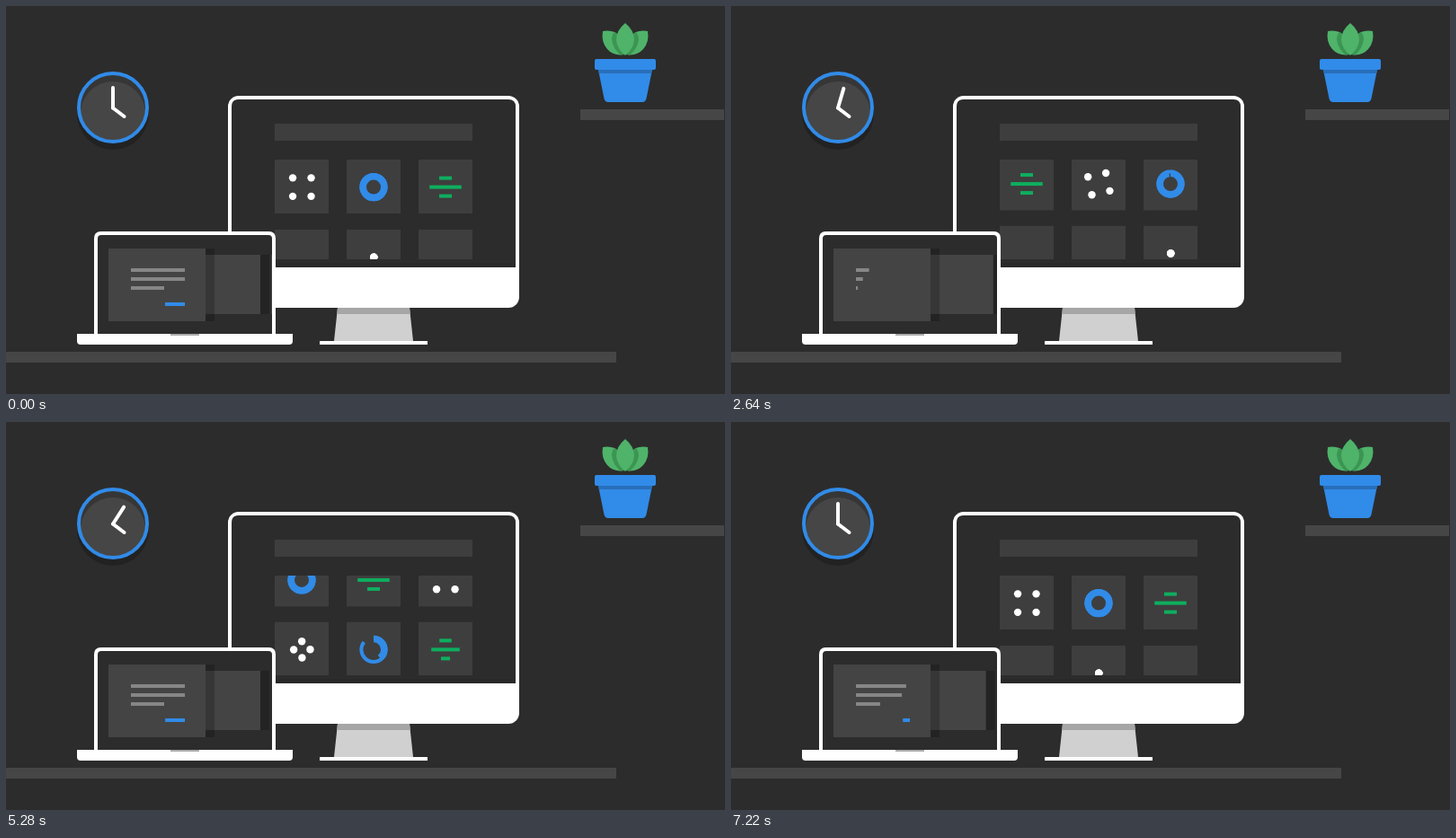
These frames come from a looping animation (800x432 px, 7.24 s). An HTML page:

```html
<!DOCTYPE html>
<html lang="en">
<head>
<meta charset="utf-8">
<title>Desk</title>
<style>
  html, body { margin: 0; width: 100%; height: 100%; overflow: hidden; background: #2c2c2c; }
  svg { display: block; width: 800px; height: 432px; }
  .blue { fill: #318be8; }
  .white { fill: #fff; }
  .screen { fill: #2c2c2c; }
  .shelf { fill: #464646; }
  .tile { fill: #3e3e3e; }
  .page { fill: #444; }
  .copy { fill: #868686; }
  .green { fill: #0eae5e; }
  .leaf { fill: #4fb36a; }
  .shade { fill: #000; opacity: .2; }
  .ring { fill: none; stroke: #318be8; }
  .hand { stroke: #fff; stroke-width: 4; stroke-linecap: round; stroke-linejoin: round; }
</style>
</head>
<body>
<svg viewBox="0 0 800 432">
  <defs>
    <clipPath id="grid-clip"><rect x="299" y="171" width="220" height="111"/></clipPath>
    <clipPath id="lap-clip"><rect x="102" y="255" width="194" height="110" rx="4"/></clipPath>
    <clipPath id="face-clip"><circle cx="119" cy="113" r="37"/></clipPath>
    <path id="side" d="M664 28Q677 26 683 34Q688 42 688 54Q676 56 669 48Q662 40 664 28Z"/>
    <clipPath id="leaf-clip">
      <use href="#side"/>
      <use href="#side" transform="matrix(-1 0 0 1 1378 0)"/>
    </clipPath>
  </defs>
  <rect width="800" height="432" class="screen"/>

  <!-- clock -->
  <circle cx="119" cy="120" r="40" fill="#222"/>
  <circle cx="119" cy="113" r="38" fill="#363636"/>
  <circle cx="119" cy="120" r="36" fill="#464646" clip-path="url(#face-clip)"/>
  <circle cx="119" cy="113" r="38" class="ring" stroke-width="4"/>
  <path class="hand" d="M119 113.5L131.5 123"/>
  <path class="hand" id="minute" d="M119 113.5V91"/>

  <!-- plant -->
  <rect x="639" y="115" width="160" height="12" class="shelf"/>
  <path class="blue" d="M659 71H719L712.5 103Q711.500 107 708 107H670Q666.500 107 665.500 103Z"/>
  <path fill="#286fba" d="M659 71H719L718.200 75H659.800Z"/>
  <rect x="655" y="59" width="68" height="12" rx="2" class="blue"/>
  <use href="#side" class="leaf"/>
  <use href="#side" class="leaf" transform="matrix(-1 0 0 1 1378 0)"/>
  <path fill="#3c9552" clip-path="url(#leaf-clip)" d="M689 19Q674 27 674 37Q675 47 684 55H694Q703 47 704 37Q704 27 689 19Z"/>
  <path class="leaf" d="M689 19Q699 27 699 38Q698 48 689 55Q680 48 679 38Q679 27 689 19Z"/>

  <!-- monitor -->
  <path fill="#d0d0d0" d="M369 336H449L453 373H365Z"/>
  <path fill="#a6a6a6" d="M369 336H449L449.800 343H368.200Z"/>
  <rect x="349" y="373" width="120" height="4" class="white"/>
  <rect x="247" y="100" width="324" height="236" rx="12" class="white"/>
  <path class="screen" d="M251 291V112Q251 104 259 104H559Q567 104 567 112V291Z"/>
  <rect x="251" y="286" width="316" height="5" fill="#292929"/>
  <rect x="299" y="131" width="220" height="19" class="tile"/>
  <g clip-path="url(#grid-clip)"><g id="grid"></g></g>

  <!-- laptop -->
  <rect x="0" y="385" width="679" height="12" class="shelf"/>
  <path class="white" d="M98 365V259Q98 251 106 251H292Q300 251 300 259V365Z"/>
  <path class="screen" d="M102 365V259Q102 255 106 255H292Q296 255 296 259V365Z"/>
  <g clip-path="url(#lap-clip)" id="deck"></g>
  <path class="white" d="M79 365H319V373Q319 377 315 377H83Q79 377 79 373Z"/>
  <rect x="183" y="365" width="32" height="2" fill="#aaa"/>
</svg>
<script>
const LOOP = 7240;
const $ = id => document.getElementById(id);
const clamp = x => Math.min(1, Math.max(0, x));
const span = (t, start, length) => clamp((t - start) / length);
const outQuart = x => 1 - (1 - x) ** 4;
const inOut = (x, p) => x < .5 ? (2 * x) ** p / 2 : 1 - (2 - 2 * x) ** p / 2;

function set(el, attrs) {
  for (const k in attrs) el.setAttribute(k, attrs[k]);
}
function add(parent, tag, attrs = {}) {
  const el = document.createElementNS('http://www.w3.org/2000/svg', tag);
  set(el, attrs);
  return parent.appendChild(el);
}

// Monitor: rows of three icons, scrolled one row at a time
const rowY = [0, 78, 155.4, 232.8, 310.8];
const rowStart = [5031 - LOOP, 1348, 3241, 5031, 1348 + LOOP];
const scrollStart = [100, 2490, 4874];
const barWidth = [14, 35.5, 14];

const rows = rowY.map((y, r) => {
  const row = add($('grid'), 'g', { transform: `translate(299 ${171 + y})` });
  const cells = [0, 1, 2].map(i => {
    const x = (r + i) % 3 * 80;
    add(row, 'rect', { class: 'tile', x, width: 60, height: 60 });
    return add(row, 'g', { transform: `translate(${x + 30.3} 30.6)` });
  });
  const ring = (r, width) => add(cells[1], 'circle', {
    class: 'ring', r, 'stroke-width': width, pathLength: 1, transform: 'translate(-.3 0) rotate(-90)'
  });
  return {
    start: rowStart[r],
    dots: [0, 1, 2, 3].map(() => add(cells[0], 'circle', { class: 'white', r: 4.2 })),
    thin: ring(13.6, 4),
    thick: ring(11.8, 7.6),
    bars: barWidth.map((w, i) => add(cells[2], 'rect', { class: 'green', y: i * 10 - 12, height: 4 }))
  };
});

function drawRow({ start, dots, thin, thick, bars }, t) {
  const age = t - start;
  const radius = 14.5 * (1 - Math.exp(-Math.max(0, age) * .004));
  const turn = 45 - 360 * (1 - outQuart(span(age, 0, 2270)));
  dots.forEach((dot, i) => {
    const a = (turn + i * 90) * Math.PI / 180;
    set(dot, { cx: radius * Math.cos(a), cy: radius * Math.sin(a) });
  });
  set(thin, { 'stroke-dasharray': `${outQuart(span(age, -325, 1500))} 2` });
  set(thick, { 'stroke-dasharray': `${outQuart(span(age, 0, 2100))} 2` });
  bars.forEach((bar, i) => {
    const width = barWidth[i] * outQuart(span(age, -325 + i * 150, 1000));
    set(bar, { x: -width / 2 - .3, width });
  });
}

// Laptop: the front page leaves, the next one steps up, a third slides in
const slideStart = [1237, 3509, 5596];
const typeStart = [2405, 4566, 6776];
const typeDelay = [0, 45, 90, 178];
const copyWidth = [60, 60, 37, 22];

const [nextPage, midPage, frontPage] = [0, 1, 2].map(() => {
  const g = add($('deck'), 'g');
  const shade = add(g, 'rect', { class: 'shade', x: 54, y: -40.5, height: 81 });
  add(g, 'rect', { class: 'page', x: -54, y: -40.5, width: 108, height: 81 });
  const copy = copyWidth.map((w, i) => add(g, 'rect', {
    class: i < 3 ? 'copy' : 'blue', x: -29, y: i < 3 ? i * 10 - 18.5 : 19.5, height: 4
  }));
  return { g, shade, copy };
});

function drawPage(page, x, scale, typed) {
  set(page.g, { transform: `translate(${x} ${310 + (scale - .815) * 2.7}) scale(${scale})` });
  set(page.shade, { width: 10 / scale });
  page.copy.forEach((line, i) => {
    const width = copyWidth[i] * inOut(span(typed, typeDelay[i], 600), 3);
    set(line, { width });
    if (i === 3) set(line, { x: 31 - width });
  });
}

function drawDeck(t) {
  const c = t < slideStart[1] ? 0 : t < slideStart[2] ? 1 : 2;
  const u = t - slideStart[c];
  const step = inOut(span(u, 400, 550), 2);
  drawPage(nextPage, 239 + 100 * (1 - span(u, 700, 1000)) ** 2, .815, 0);
  drawPage(midPage, 239 - 71 * step, .815 + .185 * step, t - typeStart[c]);
  drawPage(frontPage, 168 - 130 * span(u, 0, 900) ** 2.27, 1, 1e4);
}

function draw(now) {
  const t = now % LOOP;
  const scroll = scrollStart.reduce(
    (y, s, i) => y + (rowY[i + 1] - rowY[i]) * inOut(span(t, s, 1000), 2), 0);
  set($('grid'), { transform: `translate(0 ${-scroll})` });
  rows.forEach(row => drawRow(row, t));
  drawDeck(t);
  const angle = t < 7200 ? t * .0062 : 0;
  set($('minute'), { transform: `rotate(${angle} 119 113.5)` });
}

const begin = performance.now();
function tick() {
  draw(performance.now() - begin);
  requestAnimationFrame(tick);
}
tick();
</script>
</body>
</html>
```
